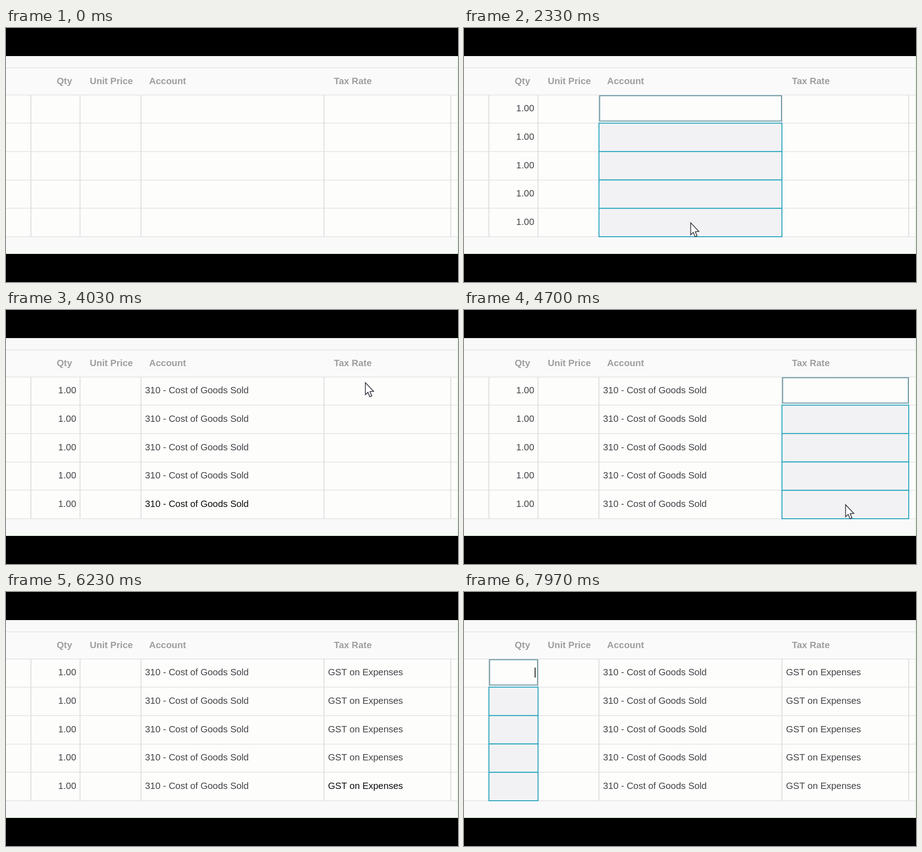
An HTML page with a canvas that plays this animation: 998 px wide and 561 px high, repeating every 8000 ms.

```html
<!DOCTYPE html>
<html lang="en">
<head>
<meta charset="utf-8">
<title>Bulk editing table cells</title>
<style>
html, body { margin: 0; width: 100%; height: 100%; overflow: hidden; background: #000; }
canvas { display: block; }
</style>
</head>
<body>
<canvas id="stage" width="998" height="561"></canvas>
<script>
const ctx = document.getElementById('stage').getContext('2d');
const LOOP = 8000;
const COLS = [55, 163.5, 298, 702, 982];
const SANS = '"Liberation Sans", Arial, sans-serif';
const MENU = '"Noto Sans", sans-serif';
const ACCOUNT = '310 - Cost of Goods Sold';
const TAX = 'GST on Expenses';
const ROW_H = 62.7, ITEM_H = 52.6, LIST_TOP = 209.5;

const rowY = i => 147.5 + i * ROW_H;
const rowMid = i => rowY(i + 0.5);
const colMid = c => (COLS[c] + COLS[c + 1]) / 2;
const itemY = i => LIST_TOP + i * ITEM_H;
const within = (t, a, b) => t >= a && t < b;

// Times inside one column edit, counted from the start of its drag.
const DRAG = 400, HIDE = 500, CLEAR = 600, OPEN = 650, TYPE = 920, TYPED = 1000, PICKED = 1400;

const firstQty = { col: 0, start: 300, length: TYPED };
const account = {
  col: 2, start: 1900, length: PICKED, right: 702, bottom: 520, scroll: true,
  hover: [623, 278], pick: 2,
  items: ['+ Add new account...', 'Expenses', ACCOUNT, '400 - Advertising', '404 - Bank Fees', '408 - Cleaning']
};
const tax = {
  col: 3, start: 4200, length: PICKED, right: 1010, bottom: 421,
  hover: [908, 419], pick: 3,
  items: ['+ Add new tax rate...', 'BAS Excluded', 'GST Free Expenses', TAX]
};
const lastQty = { col: 0, start: 7060, length: TYPED };
const jobs = [firstQty, account, tax, lastQty];
const doneAt = job => job.start + job.length;

// Pointer stops are [time, x, y].
function dragStops({ col, start }) {
  const x = colMid(col);
  return [[start, x, rowMid(0)], [start + DRAG, x, rowMid(4)], [start + HIDE, x, rowMid(4)]];
}

function pickStops(job) {
  const { start, hover, pick } = job;
  const button = [COLS[job.col + 1] - 28, rowMid(0)];
  const item = [hover[0] - 30, itemY(pick + 0.5)];
  return [
    ...dragStops(job),
    [start + OPEN - 30, ...button], [start + OPEN + 30, ...button],
    [start + 1000, ...hover], [start + 1150, ...hover],
    [doneAt(job) - 40, ...item], [doneAt(job) + 60, ...item]
  ];
}

const routes = [
  [[100, 190, 510], ...dragStops(firstQty)],
  [[1220, colMid(0), rowMid(4)], [1530, 398, 284], ...pickStops(account),
   [4030, 793, 160], ...pickStops(tax), [6000, 880, 510]],
  [[6800, 260, 510], ...dragStops(lastQty)]
];

function pointerAt(t) {
  const route = routes.find(r => within(t, r[0][0], r[r.length - 1][0]));
  if (!route) return null;
  const i = route.findIndex(p => p[0] > t);
  const [t0, x0, y0] = route[i - 1], [t1, x1, y1] = route[i];
  const u = (t - t0) / (t1 - t0), e = u * u * (3 - 2 * u);
  return { x: x0 + (x1 - x0) * e, y: y0 + (y1 - y0) * e };
}

function rect(x, y, w, h, color) {
  ctx.fillStyle = color;
  ctx.fillRect(x, y, w, h);
}

function box(x, y, w, h, fill, stroke, width = 2) {
  rect(x, y, w, h, fill);
  ctx.strokeStyle = stroke;
  ctx.lineWidth = width;
  ctx.strokeRect(x, y, w, h);
}

function text(str, x, y, font, color, align = 'left') {
  ctx.font = font;
  ctx.fillStyle = color;
  ctx.textAlign = align;
  ctx.fillText(str, x, Math.round(y));
}

// Small triangle; a negative height points up.
function triangle(x, y, half, height) {
  ctx.fillStyle = '#98989b';
  ctx.beginPath();
  ctx.moveTo(x - half, y);
  ctx.lineTo(x + half, y);
  ctx.lineTo(x, y + height);
  ctx.fill();
}

function drawGrid() {
  rect(0, 62, 998, 437, '#f9f9fa');
  rect(0, 88, 998, 59, '#fafafb');
  rect(0, 147, 998, 314, '#fdfdfc');
  rect(0, 87, 998, 2, '#e8e8ea');
  for (let i = 0; i <= 5; i++) rect(0, Math.round(rowY(i)) - 1, 998, 2, '#e8e8ea');
  COLS.forEach(x => rect(x - 1, 148, 2, 313, '#dededc'));
  rect(996.5, 62, 1.5, 437, '#dcf5d6');
  rect(0, 498, 998, 1, '#dcf5d6');
  const head = (label, x) => text(label, x, 124, 'bold 20.4px ' + SANS, '#9e9e9e');
  head('Qty', 112);
  head('Unit Price', 185);
  head('Account', 316);
  head('Tax Rate', 724);
}

function drawSelection(job, age) {
  const x = COLS[job.col], w = COLS[job.col + 1] - x;
  const count = Math.min(5, 1 + Math.floor(age / DRAG * 4.6));
  for (let i = 1; i < count; i++) box(x, rowY(i), w, ROW_H, '#f2f2f4', '#22a3bd');
  box(x + 1.5, 149.5, w - 2.5, 56, '#fdfdfc', '#60909e');
}

function drawValues(t) {
  const font = '20.4px ' + SANS;
  const column = (value, x, from, until, next, align) => {
    if (!within(t, from, until)) return;
    for (let i = 0; i < 5; i++) {
      const fresh = i === 4 && t < next;
      text(value, x, rowMid(i) + 5.3, font, fresh ? '#0c0c0e' : '#444448', align);
    }
  };
  column('1.00', 155, doneAt(firstQty), lastQty.start + CLEAR, account.start, 'right');
  column(ACCOUNT, 307, doneAt(account), LOOP, tax.start);
  column(TAX, 711, doneAt(tax), LOOP, lastQty.start);
}

function drawTyping(age) {
  if (age >= TYPE) text('1', 154, 184, '20.4px ' + SANS, '#222', 'right');
  rect(156, 167, 2, 22, '#222');
}

function drawMenu({ col, right, bottom, scroll, items }, hoverY) {
  const x = COLS[col], end = COLS[col + 1], left = x + 3;
  const width = (scroll ? 672 : right) - left;
  rect(x - 1, rowY(1), 2, 4 * ROW_H, '#6b8490');
  box(x + 1.5, 149.5, end - x - 3, 59, '#fdfdfc', '#7a9fb4');
  rect(end - 48.5, 158, 1.5, 43, '#d6d6d6');
  triangle(end - 28, 177, 7, 8.5);
  rect(x + 2, 168, 2, 23, '#111');

  box(left, 209, right - left, bottom - 209, '#fdfdfc', '#d4d4d8', 1.5);
  items.forEach((item, i) => {
    const top = itemY(i);
    if (within(hoverY, top, top + ITEM_H)) {
      rect(left + 1, top, width - 1, 52, '#e4f1f7');
      ctx.setLineDash([1.5, 1.5]);
      ctx.strokeStyle = '#9fbac6';
      ctx.lineWidth = 1;
      ctx.strokeRect(left + 1.5, top + 0.5, width - 2, 51);
      ctx.setLineDash([]);
    }
    const add = i === 0;
    const style = add ? 'bold 19.3px ' : item === 'Expenses' ? 'bold 18.9px ' : '18px ';
    text(item, left + (add ? 10.5 : 9.5), top + 33.3, style + MENU, add ? '#2a8fb3' : '#1c1c1e');
  });
  if (scroll) {
    rect(673, 210, 28, 290, '#f2f2f2');
    rect(676, 238, 21, 81.5, '#c2c2c2');
    triangle(686.5, 228.5, 6.5, -7);
  }
}

const arrow = new Path2D('M.5 .5V27L6.2 21.8L10.4 31.5L14.6 29.7L10.6 20.3L18.6 19.6Z');
const hand = new Path2D('M-3 1Q0-2 3 1V12Q6 9 8 13Q12 10 13 14Q17 12 18 17V25' +
  'Q17 30 14 34V39H-1V35L-10 24Q-12 20-8 19Q-5 19-3 23Z');
const knuckles = new Path2D('M3 12V19M8 13V19M13 14V19');

function drawPointer({ x, y }, overList) {
  ctx.save();
  ctx.translate(x, y);
  ctx.lineWidth = 1.8;
  ctx.fillStyle = '#fff';
  ctx.strokeStyle = '#3a3a44';
  ctx.fill(overList ? hand : arrow);
  ctx.stroke(overList ? hand : arrow);
  if (overList) ctx.stroke(knuckles);
  ctx.restore();
}

function draw(t) {
  const pointer = pointerAt(t);
  const job = jobs.find(j => within(t, j.start, doneAt(j)));
  const age = job ? t - job.start : 0;
  const menuOpen = Boolean(job && job.items && age >= OPEN);
  drawGrid();
  if (job) drawSelection(job, age);
  drawValues(t);
  if (menuOpen) drawMenu(job, pointer.y);
  else if (job && !job.items && age >= CLEAR) drawTyping(age);
  if (pointer) drawPointer(pointer, menuOpen && pointer.y > LIST_TOP);
  rect(0, 0, 998, 62, '#000');
  rect(0, 499, 998, 62, '#000');
}

const began = performance.now();
function tick() {
  draw((performance.now() - began) % LOOP);
  requestAnimationFrame(tick);
}
tick();
</script>
</body>
</html>
```
